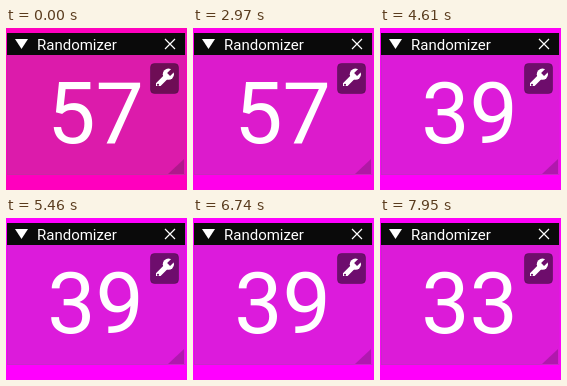
An HTML page that plays this animation: 181x162 px, repeating every 8 s.

```html
<!DOCTYPE html>
<html lang="en">
<head>
<meta charset="utf-8">
<title>Randomizer</title>
<style>
  html, body { margin: 0; width: 100%; height: 100%; overflow: hidden; }
  svg { display: block; width: 181px; height: 162px; font-family: Roboto, sans-serif; }
  text { fill: #fff; }
</style>
</head>
<body>
<svg viewBox="0 0 181 162">
  <rect id="back" width="181" height="162"/>

  <!-- panel -->
  <rect x="1" y="27" width="178" height="120" fill="rgb(111,111,111)" fill-opacity=".243"/>
  <path d="M178 131V146H162Z" fill="rgb(60,20,60)" fill-opacity=".27"/>
  <rect x="1.5" y="5.5" width="178" height="141" fill="none" stroke="rgb(110,110,128)" stroke-opacity=".18"/>

  <!-- title bar -->
  <rect x="1" y="5" width="178" height="22" fill="#0a0a0a"/>
  <path d="M9 11H22L15.5 21Z" fill="#fff"/>
  <text x="31" y="21.5" font-size="15">Randomizer</text>
  <path d="M159 11L169 21M169 11L159 21" stroke="#fff" stroke-width="1.2"/>

  <text id="number" x="89.5" y="115.3" font-size="86" text-anchor="middle"></text>

  <!-- settings button -->
  <rect x="144.5" y="35.5" width="28" height="30" rx="4" fill="#000" fill-opacity=".5" stroke="#401040" stroke-opacity=".45"/>
  <mask id="cut">
    <rect x="140" y="30" width="40" height="40" fill="#fff"/>
    <path d="M162.6 46.6L170 39.2" stroke="#000" stroke-width="4.2"/>
    <circle cx="152" cy="56.8" r="1.1"/>
  </mask>
  <g mask="url(#cut)">
    <path d="M152 56.8L161 47.8" stroke="#fff" stroke-width="5.2" stroke-linecap="round"/>
    <circle cx="162.4" cy="46.2" r="5.6" fill="#fff"/>
  </g>
</svg>
<script>
  const LOOP = 8000;
  const back = document.getElementById('back');
  const number = document.getElementById('number');

  function draw(now) {
    const t = now % LOOP;
    // the hue eases from pink to magenta
    const blue = 190 + 65 * Math.sin(Math.PI / 2 * t / 6300);
    back.setAttribute('fill', `rgb(255,0,${Math.round(blue)})`);
    number.textContent = t < 4610 ? 57 : t < 6970 ? 39 : 33;
    requestAnimationFrame(draw);
  }
  draw(performance.now());
</script>
</body>
</html>
```
